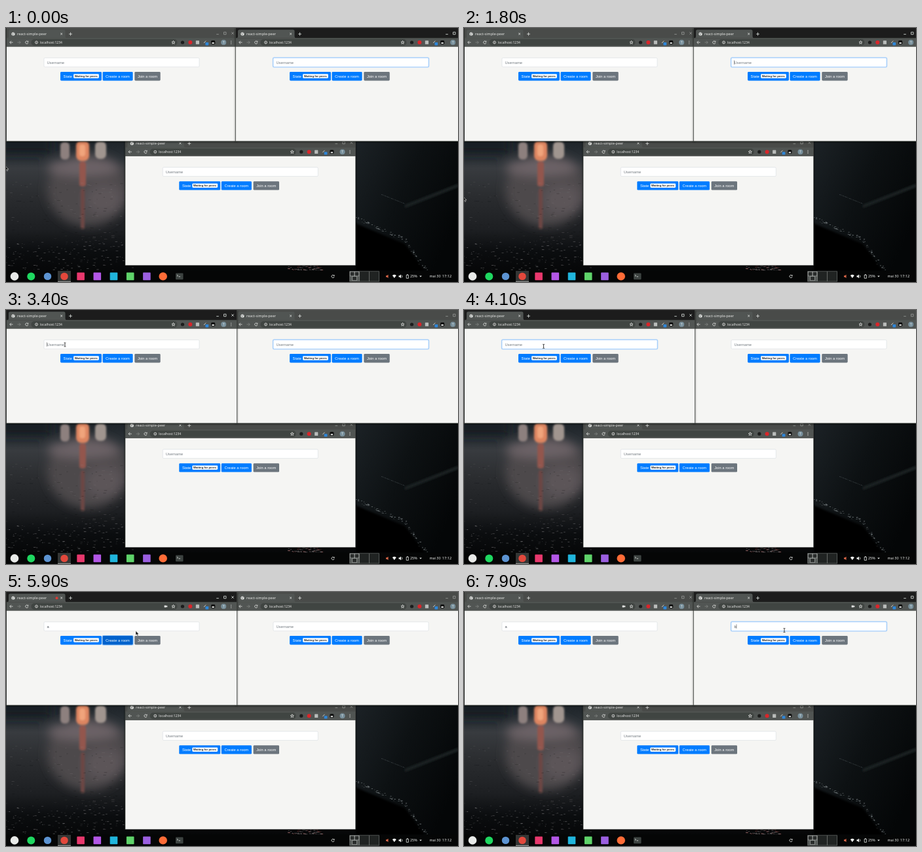
Recreate the animation shown at these times as an HTML page. Size 690 by 388 pixels, loop 8000 ms.

```html
<!DOCTYPE html>
<html lang="en">
<head>
<meta charset="utf-8">
<title>react-simple-peer</title>
<style>
  html, body { margin: 0; width: 100%; height: 100%; overflow: hidden; background: #000; }
  svg { display: block; width: 690px; height: 388px; }
  text { white-space: pre; }
  .ui { font-family: "Noto Sans", "Open Sans", sans-serif; }
  .page { font-family: "Liberation Sans", Arial, sans-serif; font-size: 5.75px; }
  .badge { font-size: 4.31px; font-weight: bold; fill: #212529; }
  .line { fill: none; stroke: #e4e6e4; stroke-width: .8; }
</style>
</head>
<body>
<svg id="stage" viewBox="0 0 690 388">
  <defs>
    <linearGradient id="night" x1="0" y1="0" x2="0" y2="1">
      <stop offset="0" stop-color="#1d2328"/>
      <stop offset=".14" stop-color="#2a3035"/>
      <stop offset=".22" stop-color="#383b3f"/>
      <stop offset=".42" stop-color="#2b2d30"/>
      <stop offset=".68" stop-color="#1d1f22"/>
      <stop offset=".85" stop-color="#0b0d0f"/>
      <stop offset="1" stop-color="#060708"/>
    </linearGradient>
    <linearGradient id="street" x1="0" y1="0" x2="1" y2=".6">
      <stop offset="0" stop-color="#1c2226"/>
      <stop offset=".5" stop-color="#0d1113"/>
      <stop offset="1" stop-color="#040607"/>
    </linearGradient>
    <filter id="soft" x="-50%" y="-50%" width="200%" height="200%"><feGaussianBlur stdDeviation="1.8"/></filter>
    <filter id="mist" x="-50%" y="-50%" width="200%" height="200%"><feGaussianBlur stdDeviation="8"/></filter>
    <filter id="shade" x="-5%" y="-5%" width="110%" height="115%">
      <feDropShadow dx="0" dy=".5" stdDeviation="1.8" flood-color="#000" flood-opacity=".8"/>
    </filter>
  </defs>

  <g id="wallpaper">
    <rect y="170" width="690" height="202" fill="url(#night)"/>
    <rect x="533" y="170" width="157" height="202" fill="url(#street)"/>
    <g filter="url(#mist)">
      <ellipse cx="125" cy="247" rx="62" ry="56" fill="#4d484c"/>
      <ellipse cx="118" cy="213" rx="55" ry="13" fill="#6d6468"/>
      <ellipse cx="150" cy="262" rx="30" ry="24" fill="#5c5559"/>
      <path d="M-10 165H70V192H-10Z" fill="#171c20"/>
    </g>
    <g filter="url(#soft)">
      <rect x="107" y="172" width="20" height="31" rx="8" fill="#dd8560"/>
      <rect x="112" y="178" width="9" height="18" rx="4" fill="#f0a47c"/>
      <rect x="83" y="174" width="14" height="27" rx="6" fill="#8d807e"/>
      <rect x="136" y="173" width="17" height="27" rx="7" fill="#a0958f"/>
      <rect x="112" y="204" width="10" height="38" rx="4" fill="#93574e"/>
      <rect x="114" y="245" width="6" height="62" rx="3" fill="#6c4644"/>
      <path d="M609 270L690 238V243L609 275Z" fill="#1a2023"/>
      <path d="M533 298L609 330L640 372H533Z" fill="#020303"/>
    </g>
    <g id="glints"></g>
  </g>

  <g id="windows"></g>

  <g id="bar" class="ui">
    <rect y="370.5" width="690" height="18" fill="#050606"/>
    <rect x="79" y="371" width="20" height="17" fill="#343635"/>
    <rect x="79" y="386.8" width="20" height="1.2" fill="#8e9290"/>
  </g>

  <g id="cursor">
    <path id="arrow" d="M0 0V6.4L1.6 5L2.7 7.4L3.9 6.9L2.9 4.6H4.8Z" fill="#111" stroke="#f4f4f4" stroke-width=".5"/>
    <path id="beam" d="M-1.4 -3H-.4L0 -2.6L.4 -3H1.4M0 -2.6V2.6M-1.4 3H-.4L0 2.6L.4 3H1.4" fill="none" stroke="#111" stroke-width=".8"/>
    <path id="hand" d="M-.6 0H.6V3L3 3.6V6L2 7.6H-1L-2.6 5L-2 4.2L-.6 5Z" fill="#111" stroke="#f4f4f4" stroke-width=".5"/>
  </g>
</svg>

<script>
const LOOP = 8000, STEP = 100;
const FOCUS_A = 3400, TYPE_A = 4700, CREATE = 5700, FOCUS_B = 6700, TYPE_B = 7600;
const PATH = [
  [0, -1, 211], [700, -1, 222], [1500, -1, 258], [2300, -1, 258], [2700, 28, 150],
  [3200, 90, 53], [3700, 90, 53], [4400, 142, 57], [5200, 142, 57], [5500, 171, 72],
  [5700, 171, 72], [5900, 198, 59.6], [6500, 476, 55], [7000, 476, 55],
  [7500, 489, 58.5], [8000, 489, 58.5]
];

const $ = id => document.getElementById(id);
const clamp = v => Math.max(0, Math.min(1, v));
const ramp = (t, start) => clamp((t - start) / 200);
const show = (node, on) => node.setAttribute("visibility", on ? "inherit" : "hidden");

function add(parent, tag, attrs, text) {
  const node = document.createElementNS("http://www.w3.org/2000/svg", tag);
  for (const key in attrs) node.setAttribute(key, attrs[key]);
  if (text) node.textContent = text;
  return parent.appendChild(node);
}
const rect = (g, x, y, width, height, fill, rx = 0) => add(g, "rect", { x, y, width, height, fill, rx });
const dot = (g, cx, cy, r, fill) => add(g, "circle", { cx, cy, r, fill });
const line = (g, d) => add(g, "path", { d, class: "line" });
const label = (g, x, y, text, fill, size) =>
  add(g, "text", size ? { x, y, fill, "font-size": size } : { x, y, fill }, text);

function reload(g, x, y) {
  line(g, `M${x + 1.6} ${y - 1.4}A2.1 2.1 0 1 0 ${x + 2.1} ${y + .5}M${x + 2.2} ${y - 2.4}V${y - .8}H${x + .6}`);
}

function makeWindow(x, y, bottom) {
  const root = add($("windows"), "g", { transform: `translate(${x} ${y})`, filter: "url(#shade)" });
  const ui = add(root, "g", { class: "ui" });
  rect(ui, .4, 0, 352.2, bottom + .7, "#3c3f3d");
  const title = rect(ui, 1, 0, 351, 17, "#4a4c4a");
  add(ui, "path", { d: "M2 15.5Q4 15 4 13V5Q4 2.5 6.5 2.5H88Q90.5 2.5 90.5 5V13Q90.5 15 93 15.5Z", fill: "#515452" });
  rect(ui, 1, 15.3, 351, 13.4, "#515452");
  dot(ui, 11, 9, 2.6, "#e4e6e4");
  add(ui, "path", { d: "M9.4 8.2L11 9.2L10.4 10.8M11.6 6.8L12.6 8.4", fill: "none", stroke: "#515452", "stroke-width": .8 });
  label(ui, 17, 11.3, "react-simple-peer", "#e6e8e6", 5.45);
  const record = dot(ui, 77.5, 9.2, 2, "#d93b35");
  line(ui, "M83.2 7.6L86 10.4M86 7.6L83.2 10.4");
  line(ui, "M96 9.2H101M98.5 6.7V11.7");
  const controls = line(ui, "M321.2 9.6H324.8M332.5 6.3H336V9.8H332.5ZM344.3 6.3L347.7 9.7M347.7 6.3L344.3 9.7");

  line(ui, "M10.5 22H5.8M8 19.7L5.7 22L8 24.3");
  add(ui, "path", { d: "M17.5 22H22.2M20 19.7L22.3 22L20 24.3", fill: "none", stroke: "#858986", "stroke-width": .8 });
  reload(ui, 31.7, 22);
  rect(ui, 38.5, 17, 223, 10, "#414442", 5);
  add(ui, "circle", { cx: 46.5, cy: 22, r: 2, class: "line" });
  line(ui, "M46.5 21.7V23.2M46.5 20.6V21");
  label(ui, 52, 23.8, "localhost:1234", "#e6e8e6", 5);
  const camera = add(ui, "path", { d: "M241.6 20.5H244.8V21.5L246.3 20.6V23.4L244.8 22.5V23.5H241.6Z", fill: "#e4e6e4" });
  line(ui, "M255.5 19.5L256.2 21.2L258 21.3L256.6 22.5L257.1 24.3L255.5 23.3L253.9 24.3L254.4 22.5L253 21.3L254.8 21.2Z");
  dot(ui, 269.5, 22, 2.6, "#1c1e1d");
  dot(ui, 281.3, 22, 3, "#d9252c");
  rect(ui, 289.8, 19.3, 5.2, 5.4, "#b9bcba", .5);
  line(ui, "M302 23L305.2 19.6");
  rect(ui, 304.4, 22, 4.8, 4.4, "#2f86d8", .6);
  rect(ui, 313, 19, 6.2, 5.8, "#0d0e0e", 1.6);
  rect(ui, 314.4, 22, 3.4, 2, "#dfe2df");
  dot(ui, 332.2, 22, 4, "#78909c");
  label(ui, 330.9, 23.7, "T", "#f1f3f2", 4.6);
  for (const dy of [-2, 0, 2]) dot(ui, 343.7, 22 + dy, .6, "#e4e6e4");

  const page = add(root, "g", { class: "page" });
  rect(page, 1, 28.7, 351, bottom - 28.7, "#f5f5f3");
  const halo = rect(page, 56.8, 44.5, 239.4, 16.1, "#007bff", 2.5);
  const field = add(page, "rect", { x: 58, y: 45.7, width: 237, height: 13.7, rx: 1.44, fill: "#fff", "stroke-width": .5 });
  const hint = label(page, 62.4, 54.7, "Username", "#757c82");
  const value = label(page, 62.4, 54.7, "", "#495057");
  const caret = rect(page, 62.1, 49.4, .5, 6.4, "#222");
  rect(page, 83, 67, 62.9, 13.4, "#007bff", 1.44);
  label(page, 87.6, 75.5, "State", "#fff");
  rect(page, 103, 70.2, 38.9, 6.6, "#f8f9fa", 1.44);
  add(page, "text", { x: 104.7, y: 75, class: "badge" }, "Waiting for peers");
  const ring = rect(page, 146.4, 65.9, 48.3, 15.6, "#268fff", 2.5);
  const create = rect(page, 147.5, 67, 46.1, 13.4, "#007bff", 1.44);
  label(page, 152.1, 75.5, "Create a room", "#fff");
  rect(page, 196.3, 67, 39.4, 13.4, "#6c757d", 1.44);
  label(page, 200.9, 75.5, "Join a room", "#fff");

  return function paint(s) {
    title.setAttribute("fill", s.active ? "#1b1e1d" : "#4a4c4a");
    controls.setAttribute("stroke-opacity", s.active ? 1 : .5);
    show(record, s.record);
    show(camera, !!s.text);
    halo.setAttribute("opacity", .27 * s.glow);
    field.setAttribute("stroke", s.glow > .5 ? "#80bdff" : "#ced4da");
    show(hint, !s.text);
    value.textContent = s.text;
    caret.setAttribute("x", s.text ? 65.7 : 62.1);
    show(caret, s.caret);
    ring.setAttribute("opacity", .5 * s.ring);
    create.setAttribute("fill", s.pressed ? "#0062cc" : s.hover ? "#0069d9" : "#007bff");
    if (s.active && root !== $("windows").lastChild) $("windows").append(root);
  };
}

// Wet ground: seeded specks on the road and along the kerb.
function makeGlints() {
  let seed = 7;
  const rand = () => (seed = seed * 16807 % 2147483647) / 2147483647;
  const speck = (x, y, width, fill, alpha) =>
    rect($("glints"), x, y, width, .8, fill).setAttribute("opacity", alpha);
  for (let i = 0; i < 150; i++) speck(rand() * 182, 235 + rand() * 95, 1 + rand() * 4, i % 2 ? "#08090a" : "#8a8488", .1 + rand() * .25);
  for (let i = 0; i < 170; i++) speck(rand() * 200, 325 + rand() * 45, .8 + rand() * 3, "#a3a0a2", .1 + rand() * .45);
  for (let i = 0; i < 90; i++) {
    const u = rand();
    const x = u < .7 ? 534 + u * 107 : 609 + (u - .7) * 103;
    const y = u < .7 ? 289 + u * 50 : 324 + (u - .7) * 155;
    speck(x + rand() * 5 - 2.5, y + rand() * 5 - 2.5, .8 + rand() * 2, "#a9b2b5", .2 + rand() * .5);
  }
  for (let i = 0; i < 24; i++) speck(573 + i * 1.5, 254 + i * .6, 1.2, "#6e777b", .2 + rand() * .4);
  for (let i = 0; i < 50; i++) speck(430 + rand() * 52, 363 + rand() * 7, 1 + rand() * 4, i % 4 ? "#a89da0" : "#b5544e", .3 + rand() * .5);
}

function makeBar() {
  const bar = $("bar");
  const discs = [[13, 6.3, "#e8eae8"], [38.3, 6, "#1ed760"], [63.5, 5.7, "#5c93d1"], [89, 5.7, "#e2483c"], [239.7, 6.2, "#ff6c37"]];
  for (const [x, r, fill] of discs) dot(bar, x, 379.4, r, fill);
  ["#e8386d", "#b357e6", "#20b5dc", "#5fd36a", "#9b5fe0"].forEach((fill, i) =>
    rect(bar, 108.3 + i * 25.2, 373.6, 11.6, 11.6, fill, .8));
  rect(bar, 259, 374.4, 11.5, 9.8, "#3d4341", 1);
  line(bar, "M261 377L262.5 378.3L261 379.6M263.5 379.8H266");

  reload(bar, 499, 379.4);
  rect(bar, 524.3, 371.5, 45.5, 15.8, "#777b79");
  for (let i = 0; i < 3; i++) rect(bar, 525 + i * 15, 372.1, 14.2, 14.6, i ? "#202322" : "#555957");
  for (const [x, y] of [[525.3, 372.4], [532.2, 372.4], [528.8, 379.3]])
    add(bar, "rect", { x, y, width: 6.6, height: 6.5, fill: "#2a2d2c", stroke: "#c8cbc9", "stroke-width": .5 });

  add(bar, "path", { d: "M580 378.3H581.5L583.5 376.7V382L581.5 380.5H580Z", fill: "#e0694a" });
  add(bar, "path", { d: "M589.8 378Q592.8 375.6 595.8 378L592.8 382Z", fill: "#f0f2f0" });
  add(bar, "path", { d: "M599.5 378.3H601L603 376.6V382.2L601 380.5H599.5Z", fill: "#f0f2f0" });
  line(bar, "M604.2 377.6Q605.6 379.4 604.2 381.2");
  line(bar, "M611.2 377.4H614.4V382.3H611.2ZM612 376.6H613.6");
  label(bar, 617, 381.4, "25%", "#f0f2f0", 5.4);
  add(bar, "path", { d: "M631.2 378.4H634.8L632.9 380.6Z", fill: "#f0f2f0" });
  label(bar, 646.5, 381.4, "mai 30", "#f0f2f0", 5.4);
  label(bar, 665.8, 381.4, "17:12", "#f0f2f0", 5.7);
}

function pointAt(t) {
  const i = PATH.findIndex((p, k) => k && t <= p[0]);
  const [t0, x0, y0] = PATH[i - 1], [t1, x1, y1] = PATH[i];
  const u = (t - t0) / (t1 - t0), e = u * u * (3 - 2 * u);
  return [x0 + (x1 - x0) * e, y0 + (y1 - y0) * e];
}

function paintCursor(t) {
  const [x, y] = pointAt(t);
  const overField = y > 45.7 && y < 59.4 && ((x > 58 && x < 295) || (x > 408 && x < 645));
  const overButton = y > 66.8 && y < 80.4 && x > 147 && x < 194;
  $("cursor").setAttribute("transform", `translate(${x} ${y})`);
  show($("beam"), overField);
  show($("hand"), overButton);
  show($("arrow"), !overField && !overButton);
  return overButton;
}

const paintC = makeWindow(181.3, 167.2, 195.1);
const paintA = makeWindow(0, 0, 172.6);
const paintB = makeWindow(350, 0, 172.6);
makeGlints();
makeBar();
paintC({ text: "", glow: 0, ring: 0 });

const blink = (t, start) => (t - start) % 1000 < 500;

function paint(t) {
  const hover = paintCursor(t);
  const inA = t >= FOCUS_A && t < FOCUS_B;
  const typedA = t >= TYPE_A, typedB = t >= TYPE_B;
  paintA({
    active: inA,
    text: typedA ? "a" : "",
    glow: ramp(t, FOCUS_A) - ramp(t, CREATE - 100),
    caret: inA && t < CREATE && blink(t, typedA ? TYPE_A : FOCUS_A),
    ring: ramp(t, CREATE) - ramp(t, FOCUS_B),
    pressed: t >= CREATE && t < FOCUS_B + 200,
    record: t >= CREATE && t < 6400,
    hover
  });
  paintB({
    active: !inA,
    text: typedB ? "b" : "",
    glow: 1 - ramp(t, FOCUS_A) + ramp(t, FOCUS_B),
    caret: !inA && (t < FOCUS_A ? blink(t + 1000, 500) : blink(t, typedB ? TYPE_B : FOCUS_B)),
    ring: 0
  });
}

const start = performance.now();
function tick() {
  const t = (performance.now() - start) % LOOP;
  paint(Math.floor(t / STEP) * STEP);
  requestAnimationFrame(tick);
}
tick();
</script>
</body>
</html>
```
